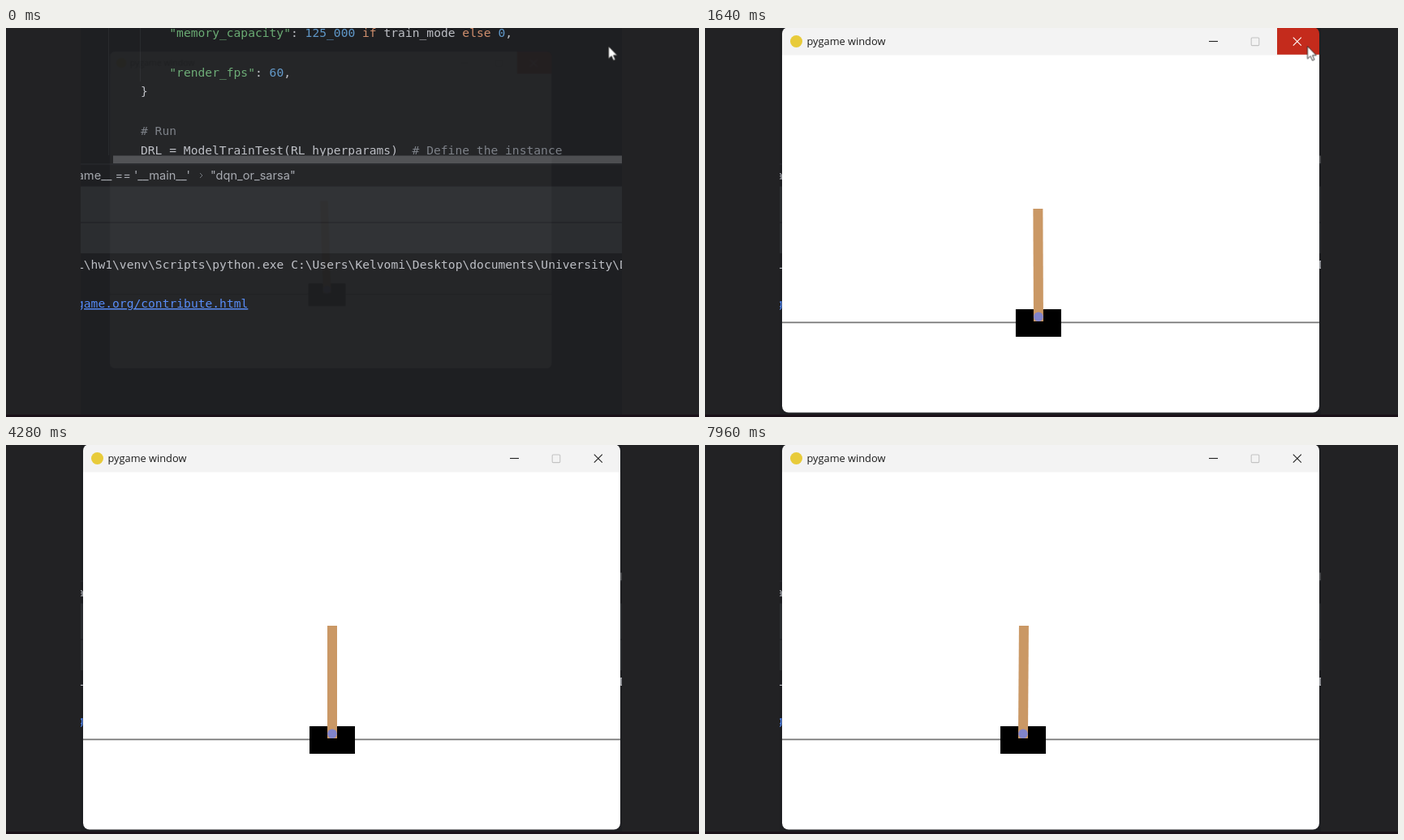
Recreate the animation shown at these times as an HTML page. Size 854x480 px, loop 8000 ms.

```html
<!DOCTYPE html>
<html lang="en">
<head>
<meta charset="utf-8">
<title>Cart pole</title>
<style>
html, body { margin: 0; width: 100%; height: 100%; overflow: hidden; background: #222224; }
svg { display: block; width: 100%; height: 100%; }
text { white-space: pre; }

.code { font: 14.64px "DejaVu Sans Mono", monospace; fill: #bcbec4; }
.crumb { font: 14.6px Inter, sans-serif; fill: #a5a8ae; }
.title { font: 12.8px "Open Sans", sans-serif; fill: #1b1b1b; }
.str { fill: #6aab73; }
.num { fill: #5f97c8; }
.key { fill: #cf8e6d; }
.note { fill: #7a7e85; }
.link { fill: #548af7; text-decoration: underline; }

.window, .cart, .pole, .hover, .close, .minimize, .cursor {
  animation: 8s linear infinite;
}
.window { transform-origin: 280px 167px; animation-name: open; animation-timing-function: step-end; }
.cart { animation-name: drift; }
.pole { transform-origin: 0 356px; animation-name: balance; }
.hover { animation-name: unhover; }
.close { animation-name: darken; }
.minimize { animation-name: focus; }
.cursor { animation-name: point; }

@keyframes open {
  0% { transform: scale(.823); opacity: .035; }
  .5% { transform: scale(.92); opacity: .6; }
  1% { transform: scale(.973); opacity: 1; }
  1.5% { transform: scale(.988); }
  2% { transform: scale(.995); }
  2.5%, 100% { transform: none; opacity: 1; }
}
@keyframes drift {
  0% { transform: translateX(420.4px); }
  1% { transform: translateX(419.6px); }
  11% { transform: translateX(413px); }
  27% { transform: translateX(409.5px); }
  32% { transform: translateX(408px); }
  42% { transform: translateX(404px); }
  49% { transform: translateX(401.6px); }
  53.5% { transform: translateX(402px); }
  63% { transform: translateX(402px); }
  73% { transform: translateX(397.6px); }
  81.5% { transform: translateX(396.2px); }
  84.5% { transform: translateX(396.2px); }
  92% { transform: translateX(392.6px); }
  99.5%, 100% { transform: translateX(392px); }
}
@keyframes balance {
  0%, 1% { transform: rotate(-1.9deg); }
  11% { transform: rotate(0deg); }
  27% { transform: rotate(-.4deg); }
  40%, 81.5% { transform: rotate(0deg); }
  99.5%, 100% { transform: rotate(.4deg); }
}
@keyframes unhover {
  0%, 21.5% { opacity: 1; }
  23%, 100% { opacity: 0; }
}
@keyframes darken {
  0%, 21.5% { stroke: #fff; }
  23%, 100% { stroke: #222; }
}
@keyframes focus {
  0%, 1% { stroke: #bbb; }
  2.5%, 100% { stroke: #222; }
}
@keyframes point {
  0%, 21.5% { transform: translate(742.5px, 22.5px); animation-timing-function: ease-in-out; }
  26.5%, 51% { transform: translate(593.5px, 153.5px); animation-timing-function: ease-in; }
  52.5% { transform: translate(730px, 85px); opacity: 1; animation-timing-function: step-start; }
  53%, 100% { transform: translate(730px, 85px); opacity: 0; }
}
</style>
</head>
<body>
<svg viewBox="0 0 854 480">
  <defs>
    <clipPath id="editorClip"><rect x="92" width="667" height="477"/></clipPath>
    <clipPath id="windowClip"><rect x="95" y="-1" width="662" height="475.5" rx="8"/></clipPath>
  </defs>

  <rect width="854" height="480" fill="#222224"/>
  <g clip-path="url(#editorClip)">
    <rect x="92" width="667" height="480" fill="#1e1f22"/>
    <path d="M126.5 0V157M165.5 0V66" stroke="#292b2e"/>
    <g class="code">
      <text x="201.3" y="11"><tspan class="str">"memory_capacity"</tspan>: <tspan class="num">125_000</tspan> <tspan class="key">if</tspan> train_mode <tspan class="key">else</tspan> <tspan class="num">0</tspan>,</text>
      <text x="201.3" y="59.5"><tspan class="str">"render_fps"</tspan>: <tspan class="num">60</tspan>,</text>
      <text x="166" y="83">}</text>
      <text x="166" y="132" class="note"># Run</text>
      <text x="166" y="156.3">DRL = ModelTrainTest(RL_hyperparams)  <tspan class="note"># Define the instance</tspan></text>
      <text x="87" y="297">L\hw1\venv\Scripts\python.exe C:\Users\Kelvomi\Desktop\documents\University\D</text>
      <text x="87" y="345" class="link">game.org/contribute.html</text>
    </g>
    <rect x="132" y="157.5" width="627" height="9.5" fill="#4d4e51"/>
    <path d="M92 168H759" stroke="#2b2d30"/>
    <g class="crumb">
      <text x="227" y="187" text-anchor="end">ame__ == '__main__'</text>
      <text x="252" y="187">"dqn_or_sarsa"</text>
    </g>
    <path d="M239 179l3 3-3 3" fill="none" stroke="#6f737a"/>
    <rect x="92" y="195.5" width="667" height="82.5" fill="#2b2d30"/>
    <path d="M92 240H759" stroke="#1e1f22"/>
  </g>
  <rect y="477" width="854" height="3" fill="#1a1118"/>

  <g class="window">
    <g clip-path="url(#windowClip)">
      <rect x="95" y="-1" width="662" height="476" fill="#fff"/>
      <rect x="95" y="-1" width="662" height="34.5" fill="#f3f3f3"/>
      <circle cx="112.5" cy="16.5" r="7.5" fill="#e8cb3a"/>
      <text x="125.5" y="21" class="title">pygame window</text>
      <rect class="hover" x="705" y="-1" width="52" height="33.8" fill="#c42b1c"/>
      <g fill="none" stroke-width="1.1">
        <path class="minimize" d="M621 16.5h11"/>
        <rect x="673.2" y="12" width="9.6" height="9.6" rx="1" stroke="#c4c4c4"/>
        <path class="close" d="M724.8 11.7l10 10m0-10l-10 10"/>
      </g>
      <path d="M95 363.3H757" stroke="#777" stroke-width="1.8"/>
      <g class="cart">
        <rect x="-28" y="347" width="56" height="34"/>
        <rect class="pole" x="-6" y="223.3" width="12" height="138.7" fill="#ca9865" shape-rendering="crispEdges"/>
        <circle cy="356.3" r="5.8" fill="#8184cb"/>
      </g>
    </g>
  </g>

  <path class="cursor" d="M0 0V15.5L3.6 12.2 6 17.6 8.5 16.5 6.1 11.2H10.8Z" fill="#fff" stroke="#222" stroke-width=".9"/>
</svg>
</body>
</html>
```
